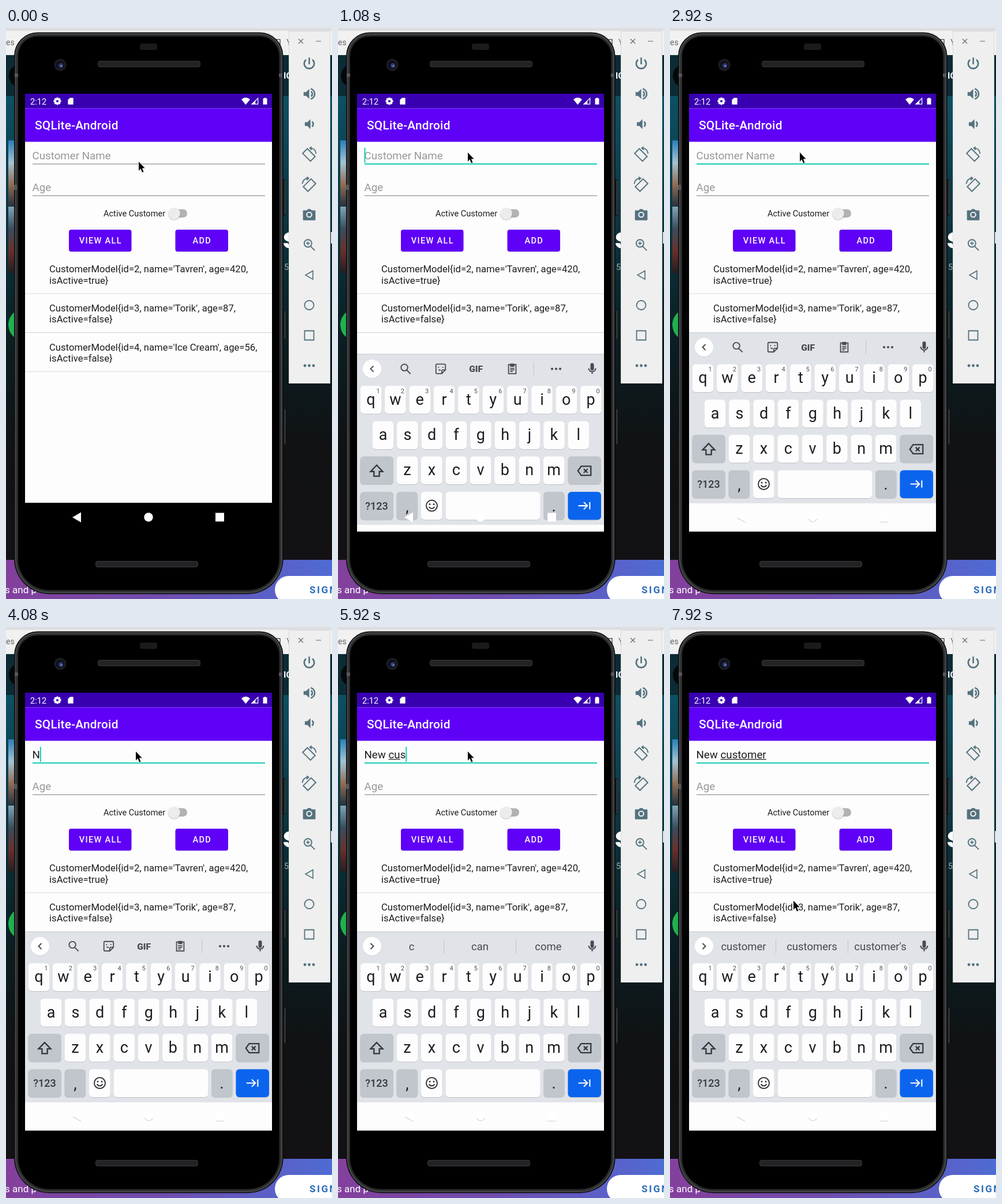
Recreate the animation shown at these times as an HTML page with a canvas. Size 565 by 991 pixels, loop 8 s.

```html
<!DOCTYPE html>
<html lang="en">
<head>
<meta charset="utf-8">
<title>SQLite-Android</title>
<style>
html, body { margin: 0; overflow: hidden; }
canvas { display: block; }
</style>
</head>
<body>
<canvas id="stage" width="565" height="991"></canvas>
<script>
const c = document.getElementById('stage').getContext('2d');
const LOOP = 8000, SP = 1.0414; // SP: screen pixels per Android sp
const PURPLE = '#5f00f7', TEAL = '#15ccb5', INK = '#1d1d1f', KEY_ICON = '#484b50', TOOL = '#54727e';

const NAME = 'New customer';
const TYPED = [4000, 4580, 4830, 5100, 5580, 5750, 5920, 6080, 6250, 6480, 6660, 7000];
const HINTS = ['N No Not', 'Ne New Need', 'New News Newer', 'year one and', 'c can come', 'cu cut current', 'cus custom customer',
  'cust custom customer', 'custo customer customers', 'custom customer customers', 'custome customer customers',
  "customer customers customer's"].map(s => s.split(' '));
const POINTER = [[0, 230, 232], [80, 230, 232], [420, 225, 216], [7400, 225, 216], [7500, 219, 320],
  [7580, 212, 470], [7670, 207, 542], [7850, 207, 542], [7920, 214, 475], [LOOP, 214, 475]];

// Icons on a 24-unit grid; 'line' is stroked, 'fill' is filled
const ICONS = {
  power: { line: 'M12 2v11M7 5.5a8 8 0 1 0 10 0' },
  louder: { fill: 'M3 9v6h4l5 5V4L7 9z', line: 'M15 8a5 5 0 0 1 0 8M14.5 3.8a8.5 8.5 0 0 1 0 16.4' },
  quieter: { fill: 'M5 9v6h4l5 5V4L9 9z', line: 'M16.5 8a5 5 0 0 1 0 8' },
  turn: { line: 'M9 3L1.5 10.5 14 23 21.5 15.5zM13 2q9 0 10 9M16 0l-3 2 3 3' },
  camera: { fill: 'M3 5h5l2-2h4l2 2h5q1 0 1 1v14q0 1-1 1H3q-1 0-1-1V6q0-1 1-1z' },
  search: { line: 'M4 9.5a6 6 0 1 0 12 0a6 6 0 1 0-12 0M14 14l7 7' },
  plus: { line: 'M7 9.5h6M10 6.5v6' },
  back: { line: 'M19 4v16L5 12z' },
  sticker: { line: 'M5 3h14q2 0 2 2v9l-7 7H5q-2 0-2-2V5q0-2 2-2zM21 14h-5q-2 0-2 2v5M8 8v2M16 8v2M8 13q2 2 4 1' },
  clipboard: { line: 'M5 4h14v17H5zM8 11h8M8 14h8M8 17h5', fill: 'M8 2h8v6H8z' },
  mic: { fill: 'M9 5a3 3 0 0 1 6 0v7a3 3 0 0 1-6 0z', line: 'M6 11a6 6 0 0 0 12 0M12 17v4' },
  shift: { line: 'M12 3.5L3 13h5v7h8v-7h5z' },
  erase: { line: 'M7 5h15v14H7L2 12zM11 9l6 6M17 9l-6 6' },
  tab: { line: 'M2 12h15M11 6l6 6-6 6M21 6v12' },
  left: { line: 'M14.5 7l-5 5 5 5' },
  right: { line: 'M9.5 7l5 5-5 5' },
  card: { fill: 'M10 2h9q1 0 1 1v18q0 1-1 1H5q-1 0-1-1V8z' },
  wifi: { fill: 'M0 7q12-10 24 0L12 22z' },
  signal: { line: 'M21 4v16H4z', fill: 'M14 10v10H4z' },
  battery: { fill: 'M9 2h6v2h3v18H6V4h3z' },
  pointer: { line: 'M0 0v17l4-4 3 7 3-1-3-7h5.5z', fill: 'M0 0v17l4-4 3 7 3-1-3-7h5.5z' }
};
for (const i of Object.values(ICONS)) for (const k in i) i[k] = new Path2D(i[k]);

function box(x, y, w, h, fill, r = 0) {
  c.fillStyle = fill;
  c.beginPath();
  c.roundRect(x, y, w, h, r);
  c.fill();
}
function dot(x, y, r, fill) {
  box(x - r, y - r, 2 * r, 2 * r, fill, r);
}
function outline(x, y, w, h, color, width, r = 0) {
  c.strokeStyle = color;
  c.lineWidth = width;
  c.beginPath();
  c.roundRect(x, y, w, h, r);
  c.stroke();
}
function text(s, x, y, size, color, { align = 'left', weight = 400, spacing = 0 } = {}) {
  c.font = `${weight} ${size}px Roboto, sans-serif`;
  c.letterSpacing = spacing + 'px';
  c.textAlign = align;
  c.fillStyle = color;
  c.fillText(s, x, y);
}
function icon(name, x, y, size, color, { width = 2, flip = 1 } = {}) {
  const { line, fill } = ICONS[name];
  c.save();
  c.translate(x, y);
  c.scale(flip * size / 24, size / 24);
  c.translate(-12, -12);
  c.fillStyle = c.strokeStyle = color;
  c.lineWidth = width;
  if (line) c.stroke(line);
  if (fill) c.fill(fill);
  c.restore();
}
function dots(x, y, color, gap, r) {
  for (const d of [-gap, 0, gap]) dot(x + d, y, r, color);
}
function gradient(x0, y0, x1, y1, ...colors) {
  const g = c.createLinearGradient(x0, y0, x1, y1);
  colors.forEach((col, i) => g.addColorStop(i / (colors.length - 1), col));
  return g;
}

function backdrop() {
  box(0, 0, 565, 991, '#f1f1f1');
  box(0, 0, 565, 5, '#dedee0');
  text('es', 0, 30, 14, '#666');
  outline(467, 20, 8, 10, '#555', 1.5);
  text('Y', 486, 30, 14, '#666');
  box(0, 47, 565, 876, gradient(0, 118, 0, 923, '#0d5063', '#0c3742', '#0a2025', '#101214', '#131114'));
  box(0, 47, 565, 71, '#0c2b35');
  dot(25, 83, 20, '#05080a');
  text('IC', 481, 88, 15, '#fff', { weight: 700 });
  box(4, 195, 20, 115, gradient(0, 195, 0, 310, '#2a7fb8', '#a3c3d2', '#8f6d54', '#26303c'));
  box(4, 310, 20, 115, gradient(0, 310, 0, 425, '#7fa5b8', '#3a4c5c', '#6a302b', '#251d20'));
  dot(32, 515, 28, '#1fb14f');
  text('s', 480, 382, 52, '#fff', { weight: 900 });
  text('5', 482, 420, 14, '#a5b0b3');
  box(563, 354, 2, 20, '#dfe5e6');
  box(0, 923, 565, 68, gradient(0, 0, 565, 0, '#83409c', '#6e4eb0', '#4f6bd4'));
  text('s and p', -2, 981, 17, '#fff');
  box(466, 951, 140, 48, '#fff', 24);
  text('SIGN', 526, 981, 17, '#2b6cb8', { weight: 700, spacing: 2.5 });
}

function phone() {
  for (const [y, h] of [[262, 64], [489, 52], [660, 64]]) {
    box(478, y, 7, h, '#17181a', 2);
    box(483, y + 2, 1, h - 4, '#55585a');
  }
  const rim = [[0, '#0b0b0c'], [1.5, '#434547'], [4, '#2a2b2d'], [7, '#000']];
  for (const [inset, color] of rim) {
    const top = 41 - inset, bottom = 61 - inset;
    box(14 + inset, 7.5 + inset, 466.5 - 2 * inset, 975 - 2 * inset, color, [top, top, bottom, bottom]);
  }
  for (const x of [15, 473]) box(x, 79, 6, 6, '#56585a');
  box(14, 272, 5, 9, '#56585a');
  box(232, 27, 30, 11, '#1b1b1c', 4);
  for (const [x, y] of [[159, 57], [155, 925]]) {
    box(x, y, 178, 11, '#232325', 4);
    outline(x + .5, y + .5, 177, 10, '#39393b', 1, 4);
  }
  dot(94, 64, 10.5, '#1c1c22');
  dot(94, 64, 7, '#0c0e1c');
  dot(95, 65, 4, '#343a6e');
  dot(96, 66, 1.5, '#838bc6');
}

function toolPanel() {
  box(490, 5, 72, 612, '#efefef');
  outline(490.5, 5.5, 71, 611, '#d8d8d8', 1);
  c.strokeStyle = '#666';
  c.lineWidth = 1.2;
  c.stroke(new Path2D('M507 19l8 8M515 19l-8 8M537 23h9'));
  ['power', 'louder', 'quieter', 'turn', 'turn', 'camera', 'search', 'back'].forEach((name, i) =>
    icon(name, 525.5, 62 + i * 52.4, name === 'back' ? 22 : 26, TOOL, { width: i < 3 ? 2.4 : 1.8, flip: i === 4 ? -1 : 1 }));
  icon('plus', 525.5, 376.4, 26, TOOL, { width: 1.6 });
  dot(525.5, 324, 5.3, '#efefef');
  dot(525.5, 324, 3.2, TOOL);
  outline(517.5, 473, 16, 16, TOOL, 1.8, 8);
  outline(517.5, 525.5, 16, 16, TOOL, 1.8);
  dots(525.5, 586, TOOL, 7.5, 2.4);
}

function statusBar() {
  box(33, 114, 428, 25.5, '#3900b1');
  text('2:12', 42, 132.5, 14.6, '#fff');
  c.save();
  c.translate(89, 127);
  for (let i = 0; i < 4; i++) {
    box(-1.7, -6.6, 3.4, 13.2, '#fff', 1);
    c.rotate(Math.PI / 4);
  }
  dot(0, 0, 4.9, '#fff');
  dot(0, 0, 2.1, '#3900b1');
  c.restore();
  icon('card', 112, 127, 14, '#fff');
  icon('wifi', 415.5, 127, 15, '#fff');
  icon('signal', 431, 127, 15, '#fff');
  icon('battery', 449, 127, 14, '#fff');
}

function button(label, x, w) {
  box(x, 351, w, 38, 'rgba(0,0,0,.1)', 4);
  box(x, 350, w, 38, PURPLE, 4);
  text(label, x + w / 2 + .6, 374.3, 14 * SP, '#fff', { align: 'center', weight: 500, spacing: 1.3 });
}

const typedCount = t => TYPED.filter(at => at <= t).length;

function nameField(t) {
  const focused = t >= 670, count = typedCount(t), size = 18 * SP;
  const typed = NAME.slice(0, count);
  text(typed || 'Customer Name', 45.5, 227.5, size, typed ? INK : '#989898');
  const width = s => c.measureText(s).width;

  const marked = typedCount(t - 130), start = marked > 4 ? 4 : 0;
  if (marked && marked !== 4) {
    const x = 45.5 + width(NAME.slice(0, start));
    box(x, 229, 45.5 + width(NAME.slice(0, marked)) - x, 1.2, INK);
  }
  if (focused) box(46, 235, 403, 2, TEAL);
  else box(46, 235.5, 403, 1, '#777');

  const idleOn = t < 1670 || Math.floor((t - 1670) / 520) % 2 === 1;
  const caretOn = count ? t < 7500 : focused && idleOn;
  if (caretOn) box(45.5 + (typed ? width(typed) : 0), 208, 2, 26, TEAL);
}

function app(t, resized) {
  box(33, 114, 428, 760, '#fefdfe');
  statusBar();
  box(33, 139.5, 428, 58, PURPLE);
  text('SQLite-Android', 50, 176.3, 20 * SP, '#fff', { weight: 500, spacing: .26 });
  nameField(t);
  text('Age', 45.5, 283, 18 * SP, '#989898');
  box(46, 290.5, 403, 1, '#777');
  text('Active Customer', 169, 327.3, 14 * SP, INK);
  box(284, 314.5, 30, 14.5, '#b2b2b2', 7.3);
  dot(291.5, 323, 10.8, 'rgba(0,0,0,.16)');
  dot(291.5, 321.8, 10.4, '#ececec');
  button('VIEW ALL', 109, 108.5);
  button('ADD', 293.5, 91.5);
  const rows = [[2, 'Tavren', 420, true], [3, 'Torik', 87, false], [4, 'Ice Cream', 56, false]];
  rows.slice(0, resized ? 2 : 3).forEach(([id, name, age, active], i) => {
    const y = 424.3 + i * 67.6;
    text(`CustomerModel{id=${id}, name='${name}', age=${age},`, 75, y, 16 * SP, INK);
    text(`isActive=${active}}`, 75, y + 19.5, 16 * SP, INK);
    box(33, y + 36.2, 428, 1.1, '#d9d9d9');
  });
}

function key(x, y, w, fill = '#fdfdfe') {
  box(x, y + 1, w, 48.5, '#bfc2c7', 6);
  box(x, y, w, 48.5, fill, 6);
}

function suggestionBar(words) {
  dot(59, 555, 16, '#cfd1d5');
  dot(59, 554, 16, '#fff');
  icon(words ? 'right' : 'left', 59, 554, 24, KEY_ICON);
  icon('mic', 440.5, 554, 24, KEY_ICON);
  if (words) {
    words.forEach((w, i) => text(w, 127.5 + i * 118.5, 561, 18.5, '#47494e', { align: 'center' }));
    for (const x of [183, 308]) box(x, 542, 1, 25, '#c3c5ca');
    return;
  }
  icon('search', 117, 554, 23, KEY_ICON);
  icon('sticker', 178, 554, 22, KEY_ICON);
  text('GIF', 239, 559.5, 15.5, KEY_ICON, { align: 'center', weight: 900 });
  icon('clipboard', 302, 554, 22, KEY_ICON);
  box(339, 542, 1, 24, '#c3c5ca');
  dots(378, 554, KEY_ICON, 7, 2.1);
}

function keyboard(t, offset) {
  const grey = '#c1c5cc', pitch = 42.35;
  const letter = (s, x, y) => text(s, x, y, 27, '#1c1d20', { align: 'center' });
  c.save();
  c.beginPath();
  c.rect(33, 528, 428, 346);
  c.clip();
  c.translate(0, offset);
  box(33, 528, 428, 297, '#e0e3e8');
  box(33, 528, 428, 1.5, '#d3d6da');
  box(33, 825, 428, 50, '#fefdfe');
  suggestionBar(HINTS[typedCount(t - 220) - 1]);

  [['qwertyuiop', 57, 583.5], ['asdfghjkl', 78, 645], ['zxcvbnm', 120, 706]].forEach(([row, x0, y], r) =>
    [...row].forEach((ch, i) => {
      const x = x0 + i * pitch;
      key(x - 18.3, y, 36.6);
      letter(ch, x, y + 32.5);
      if (r === 0) text((i + 1) % 10, x + 12.5, y + 12.5, 11, '#505257', { align: 'center' });
    }));
  key(38.5, 706, 57.5, grey);
  icon('shift', 67, 731, 28, '#35373b');
  key(398.5, 706, 57.5, grey);
  icon('erase', 427, 731, 27, '#35373b');

  key(38.5, 767.5, 57.5, grey);
  text('?123', 67, 798, 18, '#35373b', { align: 'center', weight: 500 });
  key(101.5, 767.5, 36.6, grey);
  letter(',', 120, 802);
  key(144, 767.5, 36.6);
  outline(153, 782, 19, 19, '#35373b', 2, 9.5);
  for (const x of [159, 166]) dot(x, 789, 1.5, '#35373b');
  c.stroke(new Path2D('M157.5 793.5q5 6 10 0'));
  key(186.5, 767.5, 164);
  key(356, 767.5, 36.6, grey);
  letter('.', 374, 801);
  key(398.5, 767.5, 57.5, '#0b64ee');
  icon('tab', 427, 791.5, 25, '#fff');
  c.restore();
}

function navIcons(settled) {
  c.fillStyle = '#fff';
  c.fill(new Path2D('M130 840.5v17.5l-15-8.7z'));
  dot(247, 849, 7.7, '#fff');
  box(363, 841.5, 15, 15, '#fff');
  if (!settled) return;
  c.strokeStyle = '#d0d0d2';
  c.lineWidth = 1.2;
  c.stroke(new Path2D('M116 850l14 8M240 852q7 10 15 0M363 857.5h15'));
}

function pointer(t) {
  const i = Math.max(1, POINTER.findIndex(p => p[0] > t));
  const [t0, x0, y0] = POINTER[i - 1], [t1, x1, y1] = POINTER[i];
  const k = (t - t0) / (t1 - t0);
  c.save();
  c.translate(x0 + (x1 - x0) * k, y0 + (y1 - y0) * k);
  c.scale(.85, .93);
  c.strokeStyle = '#fff';
  c.lineWidth = 1.6;
  c.stroke(ICONS.pointer.line);
  c.fillStyle = '#000';
  c.fill(ICONS.pointer.fill);
  c.restore();
}

function draw(t) {
  const opening = 920, slide = Math.min(1, Math.max(0, (t - opening) / 308));
  const resized = t >= opening;
  backdrop();
  phone();
  toolPanel();
  app(t, resized);
  if (resized) keyboard(t, 346 * (1 - slide) ** 3);
  else box(33, 824, 428, 50, '#000');
  navIcons(slide === 1);
  pointer(t);
}

function tick(now) {
  draw(now % LOOP);
  requestAnimationFrame(tick);
}
requestAnimationFrame(tick);
</script>
</body>
</html>
```
